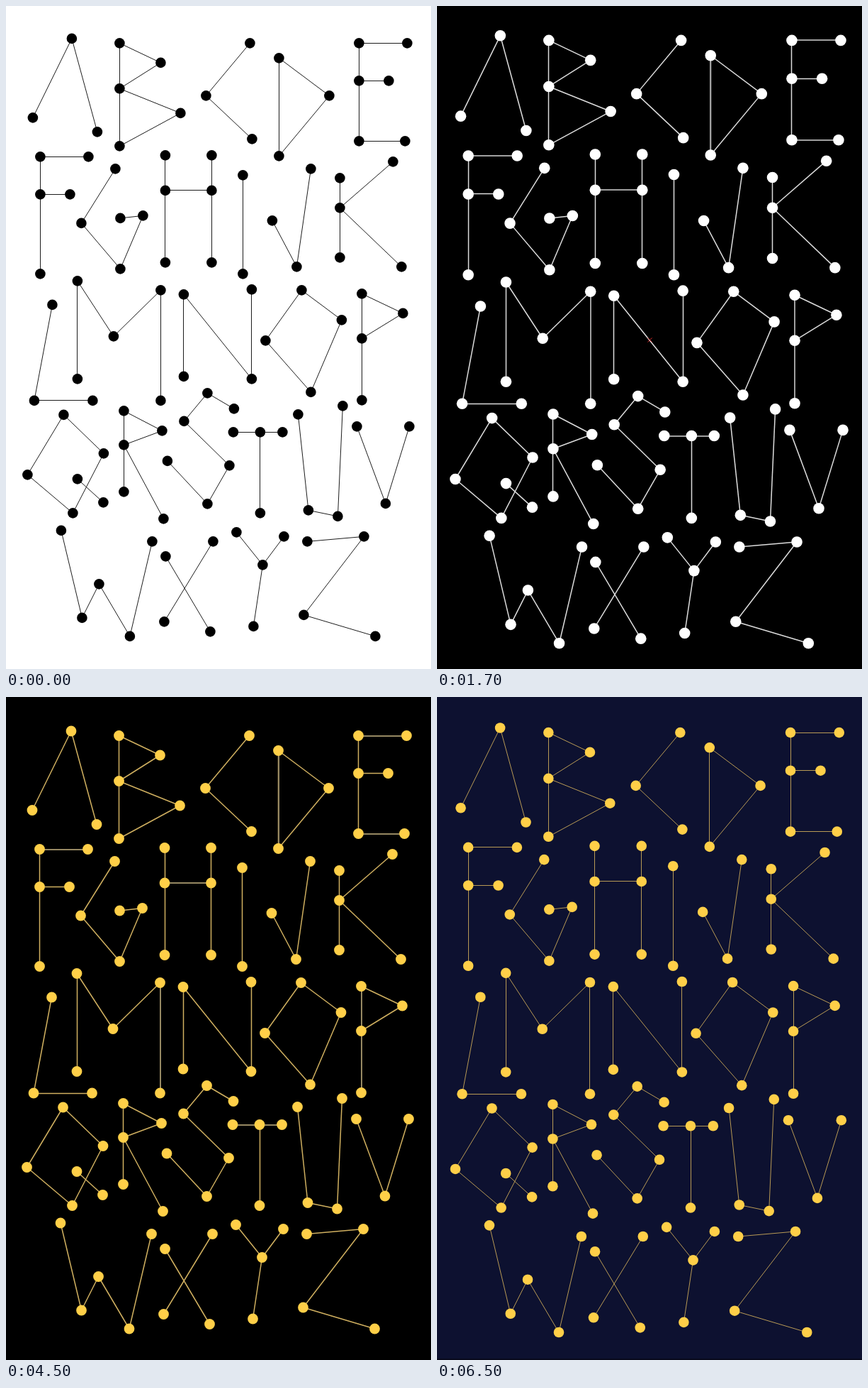
Write an HTML page with a canvas that moves like this. It is 600 by 934 pixels and loops after 8000 ms.

```html
<!DOCTYPE html>
<html lang="en">
<head>
<meta charset="utf-8">
<title>Dot alphabet</title>
<style>
  html, body { margin: 0; width: 100%; height: 100%; overflow: hidden; background: #000; }
  canvas { display: block; width: 100vw; height: 100vh; }
</style>
</head>
<body>
<canvas id="stage" width="600" height="934"></canvas>
<script>
const W = 600, H = 934;
const ctx = document.getElementById('stage').getContext('2d');

// Absolute path commands; lowercase h and v mark the soft, wide strokes.
const rows = [
  `M37.5 157L92.5 45.5L128.5 177
   M160 116L218 79.5L160 52V197L246 150.5Z
   M344 52L282 126L347 187
   M385 73L456 126L385 211Z M385 73v211
   M566 52h498V190h563 M498 105H540`,
  `M116 212h48V377 M48 265H90
   M154 229L106 305.5L161 370L193 295L161 298.5
   M224.5 210V361 M290 210V361 M224.5 259.5h290
   M334 238V377
   M430 229L410 367L375.5 302
   M471 242V354 M546 219L471 284L558 367`,
  `M65 420.5L39.5 555.5H122
   M100.5 525V387L151.5 465L218 400v555.5
   M250.5 521.5V406L346.5 525V399
   M417 400L473.5 442L430 543.5L366 471Z
   M502 468L560 432.5L502 405v555`,
  `M81 575.5L137.5 630L94 714L30 660Z M100.5 666L137 699
   M166 684V570L220 598L166 618L222 722
   M321.5 567L284 545L251 584.5L315 647L284 701L227.5 640.5
   M320.5 600h390 M358.5 600V714
   M412 575L426.5 710L468 718.5L475 563
   M495 592L535.5 700.5L569 592`,
  `M77.5 738.5L107 861.5L131 814L174.5 887.5L206 754
   M225 775L288 881 M292 754L223 867
   M325 741L362 787L392 747 M362 787L349 873.5
   M425 754L505 747L420 857.5L521 887.5`
];

const dots = new Map(), lines = [];

function parse(path) {
  let pos, start;
  for (const [, cmd, args] of path.matchAll(/([MLHVZhv])([^A-Za-z]*)/g)) {
    const n = args.trim().split(/\s+/).map(Number);
    const next = {
      M: n, L: n, Z: start,
      H: [n[0], pos && pos[1]], V: [pos && pos[0], n[0]]
    }[cmd.toUpperCase()];
    if (cmd === 'M') start = next;
    else lines.push({ a: pos, b: next, soft: cmd === 'h' || cmd === 'v' });
    dots.set(next.join(), next);
    pos = next;
  }
}
rows.forEach(parse);

const blues = ['#4584c0', '#4e7aa6', '#57575e'];
const scenes = [
  { ms: 500, bg: '#fff', dot: '#000', line: '#1c1c1c', width: 1, r: 7.3,
    sx: 1, sy: 1, x: 0.4, y: 0.4 },
  { ms: 2000, bg: '#000', dot: '#fff', line: '#dcdcdc', soft: '#a0a0a0', width: 1.5, r: 7.8,
    sx: 1.0151, sy: 1.0166, x: -4.57, y: -4.45, cross: true },
  { ms: 2000, bg: '#000', fade: blues, width: 1.5, r: 7.4, sx: 1, sy: 1, x: 0.1, y: -0.5 },
  { ms: 2000, bg: '#000', dot: '#ffcf48', line: '#d0b060', soft: '#968862', width: 1.5, r: 7.4,
    sx: 1, sy: 1, x: -0.5, y: 2.5 },
  { ms: 1500, bg: '#0d1130', dot: '#ffcf48', line: '#b89a55', width: 1, r: 7.3,
    sx: 1.0109, sy: 1.0113, x: -4.4, y: -2.5, edge: '#080a1c' }
];
const loop = scenes.reduce((sum, s) => sum + s.ms, 0);

const snap = v => Math.floor(v) + 0.5;

function ramp(x0, x1, stops) {
  const g = ctx.createLinearGradient(x0, 0, x1, 0);
  stops.forEach((c, i) => g.addColorStop(i / (stops.length - 1), c));
  return g;
}

function drawLine(s, place, { a, b, soft }) {
  let [x0, y0] = place(a), [x1, y1] = place(b);
  const wide = soft && (s.soft || s.fade);
  const align = wide ? Math.round : snap;
  if (a[0] === b[0]) x0 = x1 = align(x0);
  if (a[1] === b[1]) y0 = y1 = align(y0);
  ctx.lineWidth = wide ? 2 : s.width;
  ctx.globalAlpha = wide && s.fade ? 0.85 : 1;
  ctx.strokeStyle = s.fade
    ? ramp(Math.min(x0, x1) - 7, Math.max(x0, x1) + 7, s.fade)
    : wide ? s.soft : s.line;
  ctx.beginPath();
  ctx.moveTo(x0, y0);
  ctx.lineTo(x1, y1);
  ctx.stroke();
  ctx.globalAlpha = 1;
}

function drawDot(s, [x, y]) {
  ctx.fillStyle = s.fade ? ramp(x - s.r, x + s.r, s.fade) : s.dot;
  ctx.beginPath();
  ctx.arc(x, y, s.r, 0, Math.PI * 2);
  ctx.fill();
}

function drawCross(x, y, r) {
  ctx.strokeStyle = '#e02c2c';
  ctx.lineWidth = 1;
  ctx.beginPath();
  ctx.moveTo(x - r, y - r);
  ctx.lineTo(x + r, y + r);
  ctx.moveTo(x + r, y - r);
  ctx.lineTo(x - r, y + r);
  ctx.stroke();
}

function draw(s) {
  const place = ([x, y]) => [x * s.sx + s.x, y * s.sy + s.y];
  ctx.fillStyle = s.bg;
  ctx.fillRect(0, 0, W, H);
  if (s.edge) {
    ctx.fillStyle = s.edge;
    ctx.fillRect(0, H - 2, W, 2);
  }
  lines.forEach(l => drawLine(s, place, l));
  dots.forEach(p => drawDot(s, place(p)));
  if (s.cross) drawCross(300.5, 470.5, 3);
}

function sceneAt(t) {
  return scenes.find(s => (t -= s.ms) < 0);
}

const began = performance.now();
function tick() {
  draw(sceneAt((performance.now() - began) % loop));
  requestAnimationFrame(tick);
}
tick();
</script>
</body>
</html>
```
